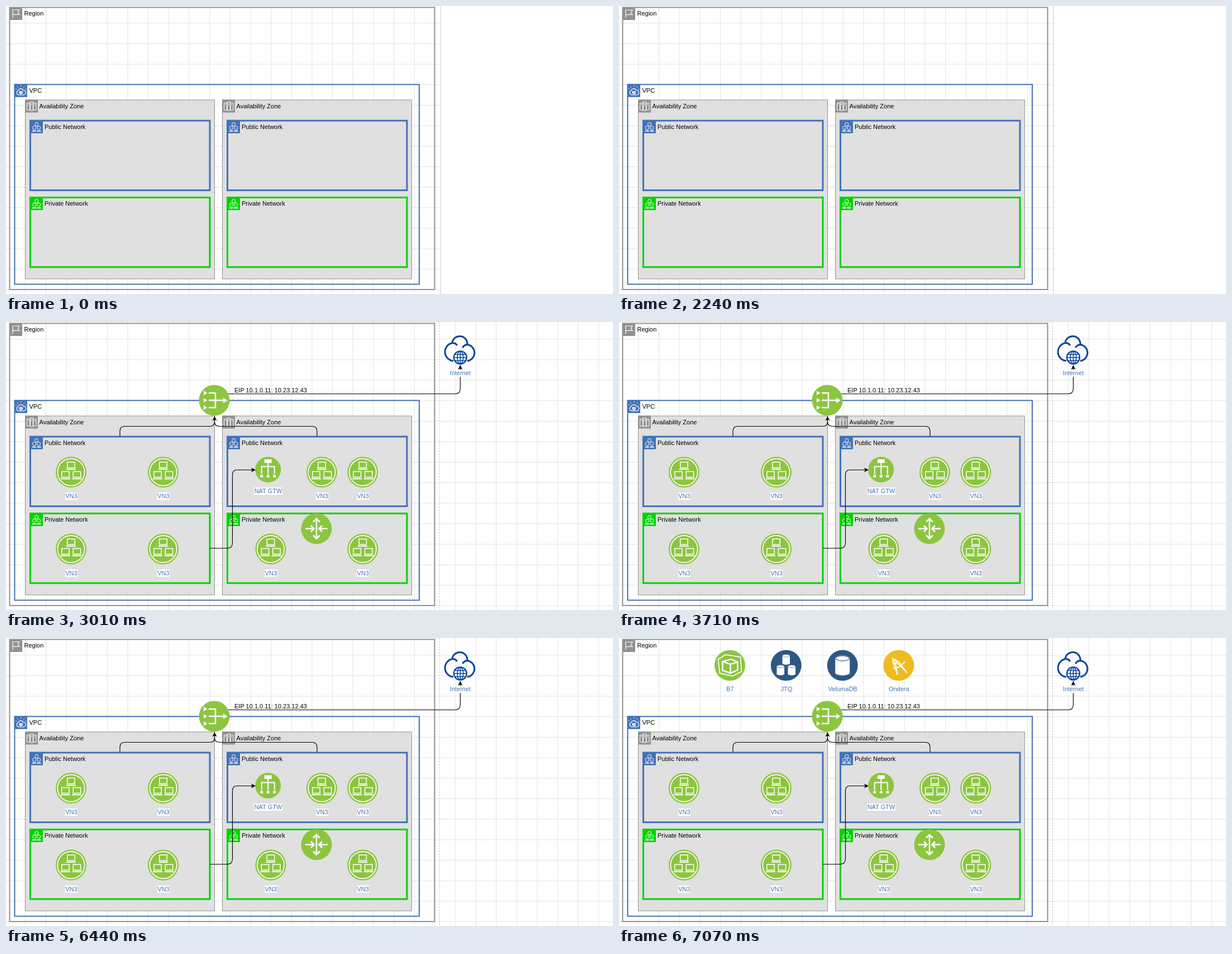
An HTML page that plays this animation: 1087x515 px, repeating every 8 s.

```html
<!DOCTYPE html>
<html lang="en">
<head>
<meta charset="utf-8">
<title>Network diagram</title>
<style>
  html, body { margin: 0; width: 100%; height: 100%; overflow: hidden; background: #fff; }
  svg { display: block; }
  text { font: 11px Helvetica, "Liberation Sans", Arial, sans-serif; }
  .label { fill: #4272b4; text-anchor: middle; }
  .line { fill: none; stroke: #000; stroke-width: 1.15; }
  .w { fill: #fff; }
  .o { fill: none; stroke: #fff; }
</style>
</head>
<body>
<svg id="stage" width="1087" height="515" viewBox="0 0 1087 515">
  <defs>
    <pattern id="grid" x="34.3" y="30.3" width="36.66" height="36.66" patternUnits="userSpaceOnUse">
      <path d="M0 .5H37M.5 0V37" fill="none" stroke="#e2e2e2"/>
    </pattern>
    <marker id="tip" markerUnits="userSpaceOnUse" markerWidth="9" markerHeight="10" refX="8" refY="5" orient="auto">
      <path d="M8 5L0 1L2 5L0 9Z"/>
    </marker>

    <!-- corner badges, 23 px square -->
    <g id="flag" class="o">
      <path d="M6 19V5H18L15 9.2L18 13.3H6" stroke-width="1.2"/>
    </g>
    <g id="cloud" class="o">
      <path d="M7 19A4 4 0 0 1 6.6 11.5A5.4 5.4 0 0 1 16.5 11A4 4 0 0 1 17 19Z" stroke-width="1.2"/>
      <path d="M4 9L2 8M7 6L5.5 4M12 4.5V2M16.5 6L18 4M19.5 9.5L21.5 8.5" stroke-width="1"/>
      <path d="M8.5 12.5H15V15.5A3.3 3 0 0 1 8.5 15.5Z" fill="#fff" stroke="none"/>
      <path d="M10 14.5L11.5 16L14 13.5" stroke="#4272b8"/>
    </g>
    <g id="servers" class="o">
      <path d="M3.5 6H8.5V18.5H3.5ZM15 6H20V18.5H15ZM9.3 4H14.3V19.5H9.3Z" stroke-width="1"/>
      <path d="M11.8 6V10M5.5 8V10M17.5 8V10" stroke-width="1"/>
    </g>
    <g id="subnet">
      <g class="o" stroke-width="1">
        <circle cx="11.7" cy="7" r="3.1"/><circle cx="7.7" cy="13.3" r="3.1"/><circle cx="15.7" cy="13.3" r="3.1"/>
      </g>
      <path class="w" d="M4 18H10V20H4ZM13 18H19.5V20H13ZM9.5 18.7H13V19.5H9.5Z"/>
    </g>

    <!-- round symbols, centred on 0,0 -->
    <g id="pc" class="o">
      <path d="M-6.7 -5.5H6.7V4.5H-6.7Z" stroke-width="1.5"/>
      <path d="M-8.5 7.3H8.5" stroke-width="2"/>
    </g>
    <g id="compute">
      <circle r="27.5" fill="#8cc540"/>
      <circle r="24.2" class="o" stroke-width="1.7"/>
      <use href="#pc" y="-12.5"/><use href="#pc" x="-10" y="4.5"/><use href="#pc" x="10.5" y="4.5"/>
    </g>
    <g id="nat">
      <circle r="23" fill="#8cc540"/>
      <path class="w" d="M-6.5 -18.5H6.5V-12H-6.5ZM-14 9.5H-9V14H-14ZM-2.5 9.5H2.5V14H-2.5ZM9 9.5H14V14H9Z"/>
      <path class="o" d="M0 -12V8M-11.5 8V-5.5H11.5V8" stroke-width="2"/>
    </g>
    <g id="router">
      <circle r="27.5" fill="#8cc540"/>
      <path class="o" d="M0 -18V18M-6 -12L0 -18L6 -12M-6 12L0 18L6 12M-20 0H-5M-10 -5.5L-4.5 0L-10 5.5M20 0H5M10 -5.5L4.5 0L10 5.5" stroke-width="2.6"/>
    </g>
    <g id="gateway">
      <circle r="27.5" fill="#8cc540"/>
      <path class="w" d="M-19 -17L-12.5 -13L-19 -9ZM-19 -4L-12.5 0L-19 4ZM-19 9L-12.5 13L-19 17ZM16 -5L23.5 0L16 5Z"/>
      <path class="o" d="M-10 -13H2V13H-10M-10 0H17" stroke-width="2.6"/>
    </g>
    <g id="internet" fill="none" stroke="#08439a">
      <path d="M-12 20.5A16.2 16.2 0 0 1 -14 -11.5A13.2 13.2 0 0 1 13 -8.5A14.6 14.6 0 0 1 13 20.5M-14 -11.5Q-8 -12 -5 -7M13 -8.5Q7 -8 4.5 -3" stroke-width="3"/>
      <g transform="translate(.5 14.5)">
        <circle r="11.5" fill="#fff" stroke-width="2.2"/>
        <ellipse rx="5.3" ry="11.3" stroke-width="1.6"/>
        <path d="M0 -11V11M-11 0H11M-9.5 -5.5H9.5M-9.5 5.5H9.5" stroke-width="1.6"/>
      </g>
    </g>
    <g id="drum">
      <path class="w" d="M-13 -13V13A13 5 0 0 0 13 13V-13A13 5 0 0 0 -13 -13Z"/>
      <ellipse cy="-12.7" rx="12.3" ry="4.5" fill="#fff" stroke="#2d5883" stroke-width="1.2"/>
    </g>
    <g id="store">
      <circle r="27.5" fill="#8cc540"/>
      <path class="o" d="M-21 -11L-8 -19L19 -15L21 11L5 19L-18 14Z" stroke-width="1.7"/>
      <path class="o" d="M-13 -7L2 -11L14 -6V8L1 14L-13 9ZM-13 -7L1 -2L14 -6M1 -2V14" stroke-width="2.4"/>
    </g>
    <g id="queue">
      <circle r="27.5" fill="#2d5883"/>
      <use href="#drum" transform="translate(0 -10.5) scale(.52)"/>
      <use href="#drum" transform="translate(-10 8.5) scale(.52)"/>
      <use href="#drum" transform="translate(10 8.5) scale(.52)"/>
    </g>
    <g id="table">
      <circle r="27.5" fill="#2d5883"/>
      <use href="#drum"/>
    </g>
    <g id="function">
      <circle r="27.5" fill="#ecbc20"/>
      <g class="o" stroke-width="1.8">
        <path d="M-6 -5L-2 17L-9 -3M-5 -7L15 13L-2 -9"/>
        <path d="M-10 5Q3 5 11 -7"/>
      </g>
      <circle class="w" cx="-7" cy="-7" r="4.5"/>
      <circle cx="-7" cy="-7" r="1.6" fill="#ecbc20"/>
      <path class="o" d="M-9 -10L-12 -14" stroke-width="2"/>
    </g>
  </defs>
</svg>
<script>
const stage = document.getElementById('stage');
const GRAY = '#919191', BLUE = '#4272b8', GREEN = '#00d200';

const rect = (x, y, w, h, attrs) => `<rect x="${x}" y="${y}" width="${w}" height="${h}" ${attrs}/>`;
const text = (x, y, s) => `<text x="${x}" y="${y}">${s}</text>`;
const icon = (id, x, y) => `<use href="#${id}" x="${x}" y="${y}"/>`;
const edge = (d, tip = true) => `<path class="line" d="${d}" ${tip ? 'marker-end="url(#tip)"' : ''}/>`;

function label(x, y, s, w) {
  return rect(x - w / 2, y - 10, w, 13, 'fill="#fff"') + `<text class="label" x="${x}" y="${y}">${s}</text>`;
}

// Outlined container with a badge and a title in its top left corner
function box(x, y, w, h, color, line, badge, title, fill = 'none', gap = 26) {
  return rect(x, y, w, h, `fill="${fill}" stroke="${color}" stroke-width="${line}"`) +
    rect(x - .5, y - .5, 23, 23, `fill="${color}"`) +
    icon(badge, x - .5, y - .5) + text(x + gap, y + 14.7, title);
}

function zone(x) {
  return box(x, 168, 339, 320, GRAY, 1, 'servers', 'Availability Zone', '#e0e0e0', 25) +
    box(x + 9, 205, 321.5, 124.5, BLUE, 3, 'subnet', 'Public Network', 'none', 25.5) +
    box(x + 9, 342.4, 321.5, 124.5, GREEN, 3, 'subnet', 'Private Network', 'none', 25.5);
}

const machines = [
  [116.5, 268.5], [281.5, 268.5], [565.5, 268.5], [638.8, 268.5],
  [116.5, 406], [281.5, 406], [474, 406], [638.8, 406]
];
const services = [
  ['store', 199, 'B7', 16], ['queue', 299.8, 'JTQ', 24],
  ['table', 400.7, 'VelumaDB', 55], ['function', 501.3, 'Ondera', 40]
];

const layers = [
  // [start, end, markup]
  [0, 8000, rect(0, 0, 1087, 515, 'fill="#fff"') + rect(0, 0, 1087, 515, 'fill="url(#grid)"')],
  [0, 2870, rect(778, 0, 309, 515, 'fill="#fff"') + rect(777.5, 0, 1.5, 515, 'fill="#dcdcdc"')],
  [2870, 8000, '<path d="M776.5 0V515" stroke="#c4c4c4" stroke-dasharray="3 2"/>'],
  [0, 8000,
    box(6.5, 2.5, 761, 504.5, GRAY, 2, 'flag', 'Region') +
    box(15.5, 140.3, 724.5, 357.2, BLUE, 2, 'cloud', 'VPC') +
    zone(34.5) + zone(387.5)],
  [2870, 8000,
    edge('M204 204V195Q204 186.5 213 186.5H365Q373.5 186.5 373.5 178V168.5') +
    edge('M557 204V195Q557 186.5 548 186.5H382Q373.5 186.5 373.5 178', false) +
    edge('M398 128.5H804Q813.5 128.5 813.5 119V77') +
    edge('M365 404.5H396Q405.5 404.5 405.5 395V273Q405.5 264.5 414 264.5H447') +
    machines.map(([x, y]) => label(x + .4, y + 46.6, 'VN3', 22)).join('') +
    label(469.5, 306, 'NAT GTW', 51) + label(813.5, 95.3, 'Internet', 38) +
    text(409, 126, 'EIP 10.1.0.11: 10.23.12.43')],
  [2940, 8000,
    machines.map(([x, y]) => icon('compute', x, y)).join('') +
    icon('nat', 469.3, 264) + icon('router', 556, 369.5) +
    icon('gateway', 373, 140) + icon('internet', 813, 49)],
  [6860, 8000, services.map(([, x, name, w]) => label(x, 95.3, name, w)).join('')],
  [6930, 8000, services.map(([id, x]) => icon(id, x - .5, 49)).join('')]
];

stage.insertAdjacentHTML('beforeend', layers.map(l => `<g class="layer">${l[2]}</g>`).join(''));
const groups = stage.querySelectorAll('.layer');

function draw(now) {
  const t = Math.max(0, now - start) % 8000;
  layers.forEach(([from, to], i) => {
    groups[i].style.display = t >= from && t < to ? '' : 'none';
  });
  requestAnimationFrame(draw);
}
const start = performance.now();
draw(start);
</script>
</body>
</html>
```
